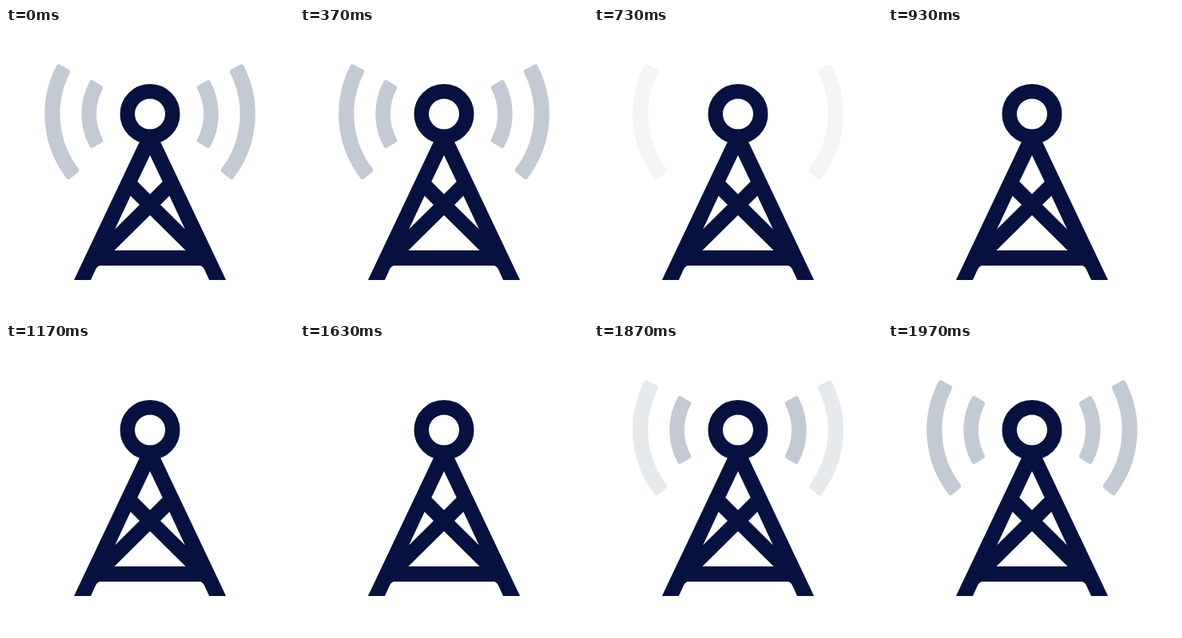
An HTML page with a canvas for the animation above (2010 ms loop, 360x360 px).

```html
<!DOCTYPE html>
<html lang="en">
<head>
<meta charset="utf-8">
<title>Radio tower</title>
<style>
  html, body { margin: 0; width: 100%; height: 100%; overflow: hidden; background: #fff; }
  canvas { display: block; width: 360px; height: 360px; }
</style>
</head>
<body>
<canvas id="stage" width="360" height="360"></canvas>
<script>
const ctx = document.getElementById('stage').getContext('2d');
const NAVY = '#06113f', GREY = '#c3cad3';
const CX = 180, CY = 107.5;
const LOOP = 2010, STEP = 100 / 3, LAST = 59;
const rad = deg => deg * Math.PI / 180;
const ramp = (x, a, b) => Math.min(1, Math.max(0, (x - a) / (b - a)));

function polygon(path, points) {
  points.forEach(([x, y], i) => i ? path.lineTo(x, y) : path.moveTo(x, y));
  path.closePath();
}

const mirror = points => points.map(([x, y]) => [2 * CX - x, y]);

function buildTower() {
  const path = new Path2D();
  path.moveTo(85, 315);
  path.lineTo(168, 140);
  path.lineTo(192, 140);
  path.lineTo(275, 315);
  path.lineTo(254, 315);
  path.lineTo(248.3, 302.5);
  path.quadraticCurveTo(246, 297, 241.5, 297);
  path.lineTo(118.5, 297);
  path.quadraticCurveTo(114, 297, 111.7, 302.5);
  path.lineTo(106, 315);
  path.closePath();

  const side = [[155.7, 209.7], [167, 221], [136.2, 251.5]];
  polygon(path, [[180, 159], [164.3, 192], [180, 207.8], [195.7, 192]]);
  polygon(path, side);
  polygon(path, mirror(side));
  polygon(path, [[180, 234], [135.5, 278], [224.5, 278]]);
  return path;
}

const tower = buildTower();

// Pair of ring sectors with softly rounded corners
function waves(inner, outer, up, down, alpha) {
  if (alpha <= 0) return;
  const round = 3;
  const r0 = inner + round, r1 = outer - round;
  ctx.save();
  ctx.globalAlpha = alpha;
  ctx.fillStyle = ctx.strokeStyle = mix(alpha);
  ctx.globalAlpha = 1;
  ctx.lineWidth = round * 2;
  ctx.lineJoin = 'round';
  ctx.translate(CX, CY);
  for (const side of [-1, 1]) {
    ctx.save();
    ctx.scale(side, 1);
    ctx.beginPath();
    ctx.arc(0, 0, r1, -rad(up) + round / r1, rad(down) - round / r1);
    ctx.arc(0, 0, r0, rad(down) - round / r0, -rad(up) + round / r0, true);
    ctx.closePath();
    ctx.fill();
    ctx.stroke();
    ctx.restore();
  }
  ctx.restore();
}

// Grey faded towards the white background
function mix(alpha) {
  const parts = [1, 3, 5].map(i => parseInt(GREY.slice(i, i + 2), 16));
  return `rgb(${parts.map(c => Math.round(255 + (c - 255) * alpha)).join(',')})`;
}

function draw(now) {
  const tick = Math.min(LAST, Math.floor((now % LOOP + 3.4) / STEP));
  const near = 1 - ramp(tick, 13, 18) + ramp(tick, 49, 54);
  const far = 1 - ramp(tick, 18, 23) + ramp(tick, 54, 59);

  ctx.fillStyle = '#fff';
  ctx.fillRect(0, 0, 360, 360);
  waves(67, 85.7, 30.5, 30.5, near);
  waves(112.5, 131.7, 28.7, 39, far);

  ctx.fillStyle = ctx.strokeStyle = NAVY;
  ctx.fill(tower, 'evenodd');
  ctx.lineWidth = 18.5;
  ctx.beginPath();
  ctx.arc(CX, CY, 28.2, 0, Math.PI * 2);
  ctx.stroke();
}

let start;
function loop(now) {
  start ??= now;
  draw(Math.max(0, now - start));
  requestAnimationFrame(loop);
}
draw(0);
requestAnimationFrame(loop);
</script>
</body>
</html>
```
